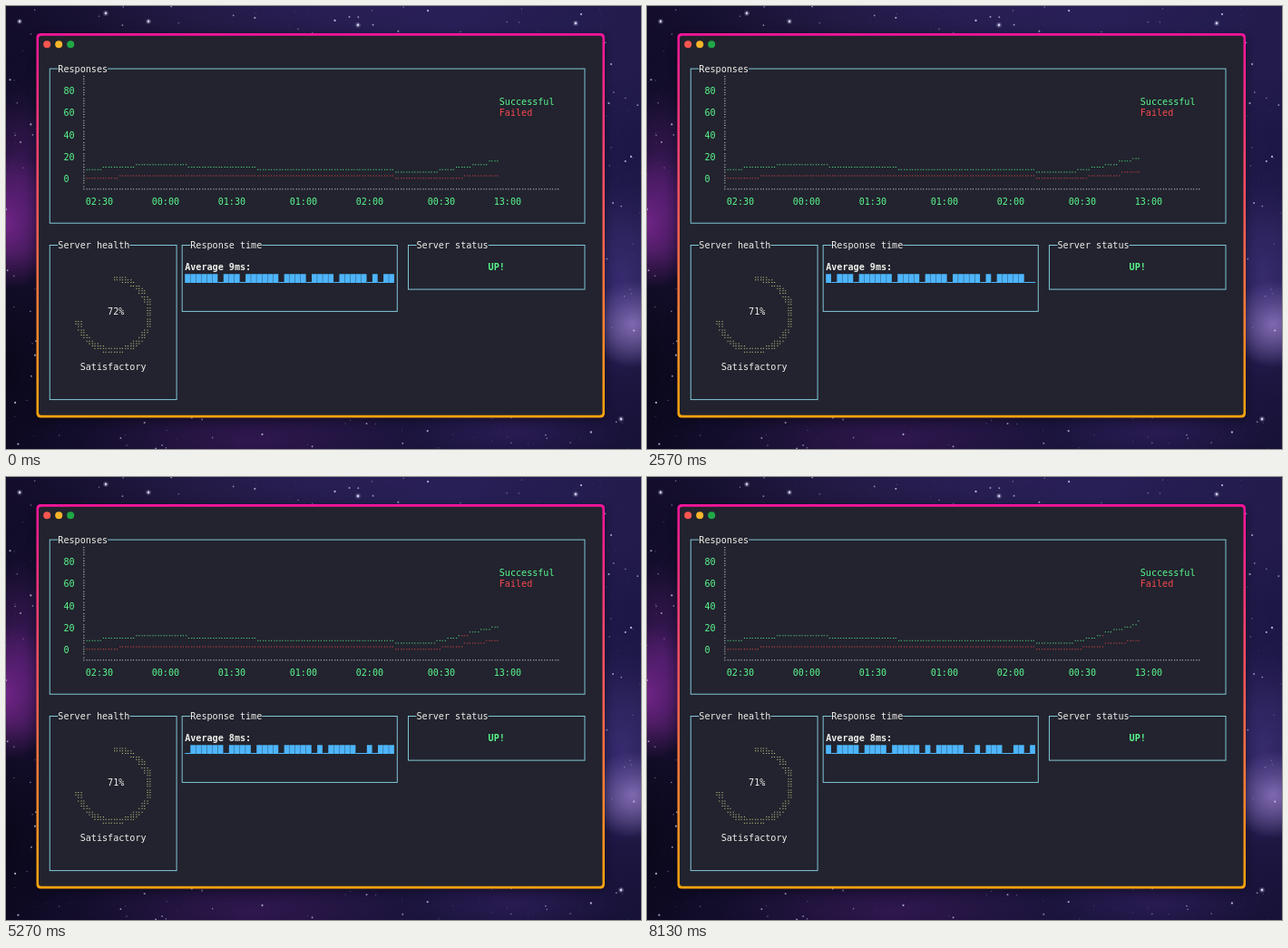
An HTML page for the animation above (8160 ms loop, 700 by 488 pixels).

```html
<!DOCTYPE html>
<html lang="en">
<head>
<meta charset="utf-8">
<title>Server dashboard</title>
<style>
  html, body { margin: 0; width: 100%; height: 100%; overflow: hidden; background: #120e2a; }
  svg { display: block; width: 700px; height: 488px; }
  text { font: 10.1px "DejaVu Sans Mono", monospace; white-space: pre; }
  .bold { font-weight: bold; }
</style>
</head>
<body>
<svg id="stage" viewBox="0 0 700 488" xmlns="http://www.w3.org/2000/svg">
  <defs>
    <linearGradient id="sky" x1="0" y1="0" x2="1" y2="0">
      <stop offset="0" stop-color="#140e2b"/>
      <stop offset=".3" stop-color="#20183f"/>
      <stop offset=".7" stop-color="#271f55"/>
      <stop offset="1" stop-color="#221b4b"/>
    </linearGradient>
    <linearGradient id="floor" x1="0" y1="0" x2="0" y2="1">
      <stop offset=".65" stop-color="#0c0822" stop-opacity="0"/>
      <stop offset="1" stop-color="#0c0822" stop-opacity=".5"/>
    </linearGradient>
    <linearGradient id="frame" x1="0" y1="0" x2="0" y2="1">
      <stop offset="0" stop-color="#ff149b"/>
      <stop offset="1" stop-color="#ffa50c"/>
    </linearGradient>
    <filter id="shadow" x="-10%" y="-10%" width="120%" height="125%">
      <feGaussianBlur stdDeviation="6"/>
    </filter>
  </defs>
  <rect width="700" height="488" fill="url(#sky)"/>
  <rect width="700" height="488" fill="url(#floor)"/>
  <g id="nebula"></g>
  <g id="stars"></g>
  <rect x="34" y="34" width="626" height="422" rx="5" opacity=".4" filter="url(#shadow)"/>
  <rect x="33.5" y="30" width="626.5" height="423.5" rx="4.5" fill="url(#frame)"/>
  <rect x="36" y="32.7" width="621.5" height="418" rx="3" fill="#22232e"/>
  <circle cx="45.2" cy="42.3" r="4" fill="#fb5650"/>
  <circle cx="58.2" cy="42.3" r="4" fill="#f8b52b"/>
  <circle cx="71.2" cy="42.3" r="4" fill="#20a846"/>
  <g id="panels"></g>
  <g id="live"></g>
</svg>
<script>
const LOOP = 8160, TICK = 500, PHASE = 150;
const CELL_W = 6.08, CELL_H = 12.15, LEFT = 45.2, TOP = 69.1;
const WHITE = "#eff0eb", GREEN = "#5af78e", RED = "#f9484f", CYAN = "#87cfe0",
      BLUE = "#4db5fb", YELLOW = "#eef29a", BG = "#22232e";
const $ = id => document.getElementById(id);
const panels = $("panels"), live = $("live");

function add(parent, tag, attrs, content) {
  const node = document.createElementNS("http://www.w3.org/2000/svg", tag);
  for (const key in attrs) node.setAttribute(key, attrs[key]);
  if (content !== undefined) node.textContent = content;
  parent.appendChild(node);
  return node;
}

// Terminal grid: x of a column's left edge, y of a row's centre
const colX = col => LEFT + col * CELL_W;
const rowY = row => TOP + row * CELL_H;

function label(col, row, content, fill = WHITE, cls = "") {
  return add(panels, "text", { x: colX(col), y: rowY(row) + 3.6, fill, class: cls }, content);
}

// Braille grid: two dots across and four down in each cell
const dotX = i => colX(i >> 1) + (i & 1 ? 4.1 : 1.4);
const dotY = j => rowY(j >> 2) - 3.65 + (j & 3) * 2.7;
const dotPath = (i, j) =>
  `M${(dotX(i) - .55).toFixed(2)} ${(dotY(j) - .5).toFixed(2)}h1.2v1h-1.2z`;

function box(col0, row0, col1, row1, title, titleCol) {
  const x = colX(col0 + .5), y = rowY(row0);
  add(panels, "rect", {
    x, y, width: (col1 - col0) * CELL_W, height: (row1 - row0) * CELL_H,
    fill: "none", stroke: CYAN, "stroke-width": .95
  });
  add(panels, "rect", {
    x: colX(titleCol), y: y - 5, width: title.length * CELL_W, height: 10, fill: BG
  });
  label(titleCol, row0, title);
}

function makeRandom(seed) {
  return () => {
    seed = (seed * 1664525 + 1013904223) >>> 0;
    return seed / 4294967296;
  };
}

function drawSky() {
  const clouds = [
    [0, 238, 60, 75, "#8c2b9c", .85], [15, 200, 55, 110, "#5c1f7c", .6],
    [0, 400, 70, 130, "#070515", .75], [30, 60, 120, 70, "#0e0a26", .5],
    [690, 350, 48, 48, "#a58bd0", .85], [680, 300, 60, 110, "#4b3a90", .5],
    [690, 160, 60, 90, "#171342", .6], [270, 478, 190, 45, "#421c63", .55],
    [560, 470, 120, 40, "#32205f", .6], [350, 0, 260, 35, "#2f2160", .5]
  ];
  clouds.forEach(([cx, cy, rx, ry, color, opacity], i) => {
    const fade = add(document.querySelector("defs"), "radialGradient", { id: "cloud" + i });
    add(fade, "stop", { offset: 0, "stop-color": color, "stop-opacity": opacity });
    add(fade, "stop", { offset: 1, "stop-color": color, "stop-opacity": 0 });
    add($("nebula"), "ellipse", { cx, cy, rx, ry, fill: `url(#cloud${i})` });
  });
  const star = (cx, cy, r, opacity) =>
    add($("stars"), "circle", { cx, cy, r, fill: "#d9d5f5", opacity });
  const random = makeRandom(41);
  for (let i = 0; i < 1500; i++) {
    const x = random() * 700, y = random() * 488, size = random() ** 5;
    if (x > 34 && x < 660 && y > 30 && y < 453) continue;
    star(x.toFixed(1), y.toFixed(1), (.35 + size * .8).toFixed(2), (.2 + size * .6).toFixed(2));
  }
  [[628, 19], [388, 21], [157, 17], [15, 17], [110, 8], [678, 455]].forEach(([x, y]) => {
    star(x, y, 3, .2);
    star(x, y, 1.4, .95);
  });
}

function drawPanels() {
  box(0, 0, 97, 14, "Responses", 2);
  box(0, 16, 23, 30, "Server health", 2);
  box(24, 16, 63, 22, "Response time", 26);
  box(65, 16, 97, 20, "Server status", 67);
  [80, 60, 40, 20, 0].forEach((value, i) => label(3, 2 + 2 * i, value, GREEN));
  const times = { "02:30": 7, "00:00": 19, "01:30": 31, "01:00": 44, "02:00": 56, "00:30": 69, "13:00": 81 };
  for (const time in times) label(times[time], 12, time, GREEN);
  label(82, 3, "Successful", GREEN);
  label(82, 4, "Failed", RED);
  label(80, 18, "UP!", GREEN, "bold");
  label(6, 27, "Satisfactory");

  let axes = "";
  for (let j = 4; j <= 45; j++) axes += dotPath(13, j);
  for (let i = 14; i < 186; i++) axes += dotPath(i, 45);
  add(panels, "path", { d: axes, fill: WHITE, opacity: .8 });

  // Ring gauge, filled clockwise from the top
  let ring = "";
  for (let j = 76; j < 108; j++) for (let i = 10; i < 38; i++) {
    const dx = dotX(i) - 118.8, dy = dotY(j) - 340;
    const radius = Math.hypot(dx, dy);
    const turn = (Math.atan2(dx, -dy) / (2 * Math.PI) + 1) % 1;
    if (radius > 36.3 && radius < 43.3 && turn < .73) ring += dotPath(i, j);
  }
  add(panels, "path", { d: ring, fill: YELLOW, opacity: .75 });
}

// Chart lines are runs of [dot row, length]
const GREEN_HEAD = [[38, 6], [37, 12], [36, 19], [37, 25], [38, 50]];
const RED_HEAD = [[41, 12], [40, 100]];
const tail = (top, lengths) => lengths.map((length, i) => [top - i, length]);
const GREEN_TAILS = [
  [0, tail(39, [16, 6, 6, 6, 4])],
  [4, tail(39, [15, 5, 5, 5, 5, 3])],
  [6, tail(39, [15, 4, 4, 4, 4, 4, 3])],
  [11, tail(39, [14, 4, 4, 4, 4, 3, 4, 1])],
  [14, tail(39, [14, 4, 4, 3, 3, 4, 3, 2, 1])]
];
const RED_TAILS = [
  [0, tail(41, [25, 13])],
  [4, tail(41, [19, 12, 7])],
  [9, tail(41, [17, 8, 8, 5])]
];
const PERCENTS = [[0, 72], [2, 71], [6, 72], [9, 71]];
const AVERAGES = [[0, 9], [9, 8], [11, 9], [14, 8]];
const TAPE = "######.###.######.####.####.#####.#.#####..#.###..##.#";
const TAPE_WIDTH = 38;

const at = (steps, tick) => steps.filter(([start]) => start <= tick).pop()[1];
const expand = runs => runs.flatMap(([row, length]) => Array(length).fill(row));

drawSky();
drawPanels();
const greenLine = add(live, "path", { fill: GREEN, opacity: .85 });
const redLine = add(live, "path", { fill: RED, opacity: .85 });
const bars = add(live, "path", { fill: BLUE });
const percent = label(11, 22, "");
const average = label(25, 18, "", WHITE, "bold");

function drawChart(tick) {
  const greens = expand([...GREEN_HEAD, ...at(GREEN_TAILS, tick)]);
  const reds = expand([...RED_HEAD, ...at(RED_TAILS, tick)]);
  const cellOf = (i, j) => (i >> 1) + ":" + (j >> 2);
  const redCells = new Set(reds.map((j, i) => cellOf(i, j)));
  let greenPath = "", redPath = "";
  reds.forEach((j, i) => redPath += dotPath(i + 14, j));
  // A cell has one colour, so shared cells turn red
  greens.forEach((j, i) => {
    if (redCells.has(cellOf(i, j))) redPath += dotPath(i + 14, j);
    else greenPath += dotPath(i + 14, j);
  });
  greenLine.setAttribute("d", greenPath);
  redLine.setAttribute("d", redPath);
}

function drawBars(tick) {
  let d = "";
  for (let i = 0; i < TAPE_WIDTH; i++) {
    const full = TAPE[tick + i] === "#";
    const y = full ? 295.2 : 303.9, w = full ? 5.75 : 6.08;
    d += `M${colX(25 + i).toFixed(2)} ${y}h${w}V305.1h${-w}z`;
  }
  bars.setAttribute("d", d);
}

let shown = -1;
function render(now) {
  const tick = Math.floor((now % LOOP + PHASE) / TICK);
  if (tick !== shown) {
    shown = tick;
    drawChart(tick);
    drawBars(tick);
    percent.textContent = at(PERCENTS, tick) + "%";
    average.textContent = `Average ${at(AVERAGES, tick)}ms:`;
  }
}

const start = performance.now();
function loop() {
  render(performance.now() - start);
  requestAnimationFrame(loop);
}
loop();
</script>
</body>
</html>
```
